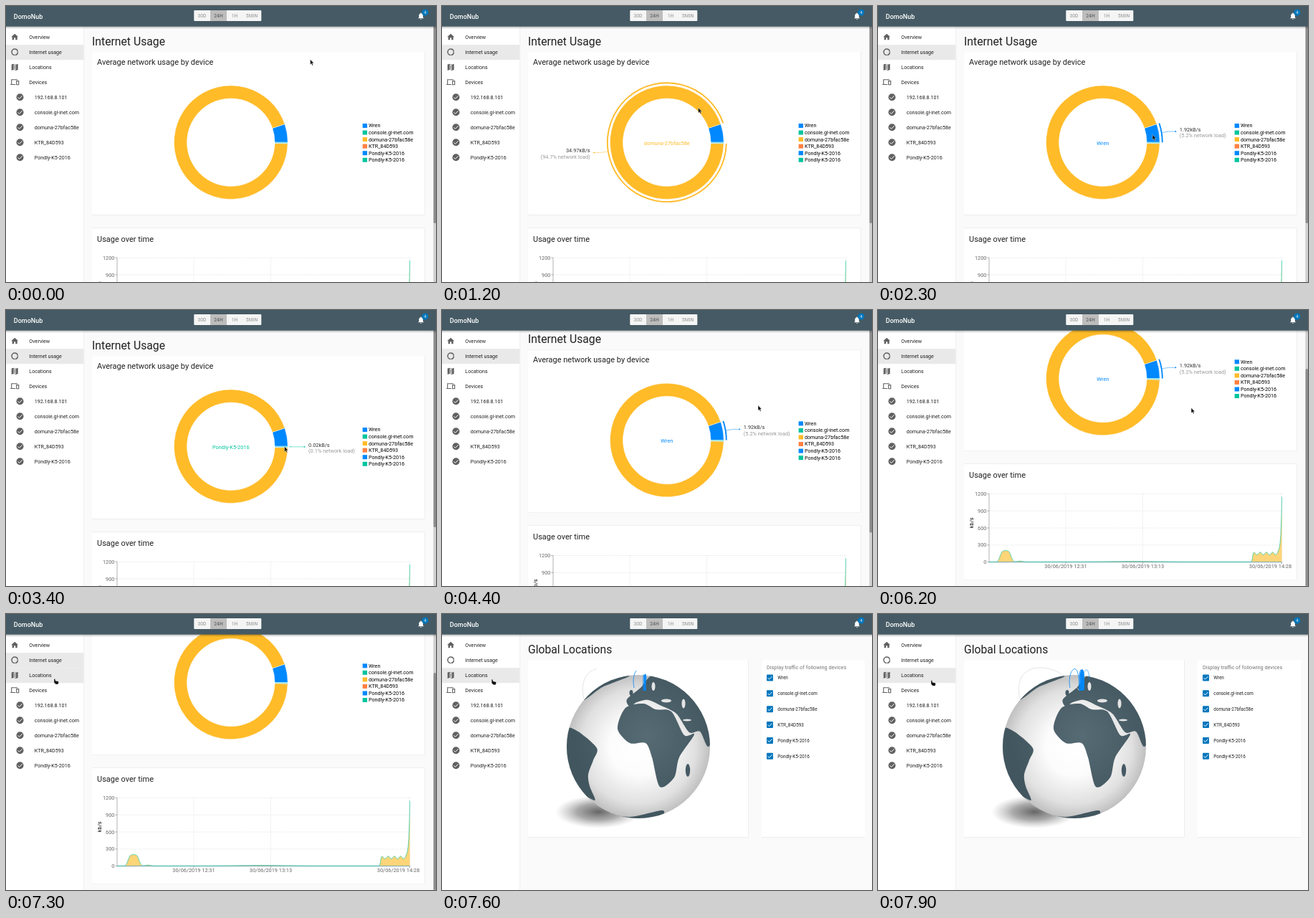
An HTML page that plays this animation: 600x385 px, repeating every 8 s.

```html
<!DOCTYPE html>
<html lang="en">
<head>
<meta charset="utf-8">
<title>Network dashboard</title>
<style>
html, body { margin: 0; width: 100%; height: 100%; overflow: hidden; background: #fafafa; }
svg { display: block; width: 600px; height: 385px; font-family: Roboto, sans-serif; }
.card { fill: #fff; filter: drop-shadow(0 .8px .6px rgba(0,0,0,.26)); }
</style>
</head>
<body>
<svg id="stage" viewBox="0 0 600 385" xmlns="http://www.w3.org/2000/svg"></svg>
<script>
const LOOP = 8000, STEP = 100;
const BLUE = '#0088fe', GREEN = '#00c49f', YELLOW = '#ffbb28', ORANGE = '#ff8042';
const SLATE = '#455a64', ACCENT = '#0277bd', GRAY = '#616161';

const devices = [
  { name: 'Wren', color: BLUE, span: 18.8, rate: '1.92', share: '5.2' },
  { name: 'console.gl-inet.com', color: GREEN, span: 0 },
  { name: 'domuna-27bfac58e', color: YELLOW, span: 340, rate: '34.97', share: '94.7' },
  { name: 'KTR_84D593', color: ORANGE, span: 0 },
  { name: 'Pondly-K5-2016', color: BLUE, span: .4, rate: '0.01', share: '0.0' },
  { name: 'Pondly-K5-2016', color: GREEN, span: .8, rate: '0.02', share: '0.1' }
];
devices.reduce((angle, d) => {
  d.from = angle;
  return d.to = angle + d.span;
}, 0);

const text = (x, y, s, size = 7.15, fill = '#212121', more = '') =>
  `<text x="${x}" y="${y}" font-size="${size}" fill="${fill}" ${more}>${s}</text>`;
const rect = (x, y, w, h, fill, more = '') =>
  `<rect x="${x}" y="${y}" width="${w}" height="${h}" fill="${fill}" ${more}/>`;
const circle = (x, y, r, fill, more = '') => `<circle cx="${x}" cy="${y}" r="${r}" fill="${fill}" ${more}/>`;
const ellipse = (x, y, rx, ry, fill) => `<ellipse cx="${x}" cy="${y}" rx="${rx}" ry="${ry}" fill="${fill}"/>`;
const card = (x, y, w, h) => rect(x, y, w, h, '#fff', 'rx="1" class="card"');
const path = (d, fill, more = '') => `<path d="${d}" fill="${fill}" ${more}/>`;
const line = (d, stroke, w = .5, more = '') => path(d, 'none', `stroke="${stroke}" stroke-width="${w}" ${more}`);
const at = (x, y, s) => `<g transform="translate(${x} ${y})">${s}</g>`;
const MID = 'text-anchor="middle"', END = 'text-anchor="end"';

// Icons, centred on the origin
const tick = line('M-3 .1L-1 2.1L3.1-2', '#fff', 1);
const icons = {
  home: path('M-1 4V1H1V4H3.5V0H5L0-4.5L-5 0H-3.5V4z', GRAY),
  usage: circle(0, 0, 4.2, 'none', `stroke="${GRAY}" stroke-width="1.5" pathLength="100" stroke-dasharray="23 3 71 3"`),
  map: path('M-4.5-3.7L-1.5-4.6L1.5-3.5L4.5-4.6V3.7L1.5 4.6L-1.5 3.5L-4.5 4.6z', GRAY) + line('M-1 -3.5L1-2.8V3.5L-1 2.8z', '#fff', .9),
  devices: line('M4-3.5H-4.5V3M-6 3.2H1M2.5-1.7H5.5V3.5H2.5z', GRAY, 1.1),
  done: circle(0, 0, 5, GRAY) + tick,
  box: rect(-4.5, -4.5, 9, 9, ACCENT, 'rx="1"') + tick,
  bell: path('M-3.8 3V2.6L-2.8 1.6V-1C-2.8-5 2.8-5 2.8-1V1.6L3.8 2.6V3zM-1 3.6H1Q0 5.4-1 3.6z', '#fff') + circle(0, -4, .7, '#fff')
};

// Donut
const CX = 313.8, CY = 190.2, R0 = 61.3, R1 = 79.3, K = .46;
const polar = (r, deg) => {
  const a = deg * Math.PI / 180;
  return [CX + r * Math.cos(a), CY - r * Math.sin(a)];
};
function sector(r0, r1, { from, to, color }, more) {
  const big = to - from > 180 ? 1 : 0;
  return path(`M${polar(r1, from)}A${r1} ${r1} 0 ${big} 0 ${polar(r1, to)}L${polar(r0, to)}` +
    `A${r0} ${r0} 0 ${big} 1 ${polar(r0, from)}z`, color, more);
}
function callout(d) {
  const mid = (d.from + d.to) / 2;
  const [sx, sy] = polar(R1 + 10 * K, mid), [mx, my] = polar(R1 + 30 * K, mid);
  const side = mx > CX ? 1 : -1, ex = mx + side * 21 * K, tx = ex + side * 12 * K;
  const anchor = side > 0 ? '' : END;
  return text(CX, CY + 3.6, d.name, 7.36, d.color, MID) +
    sector(R1 + 6 * K, R1 + 10 * K, d) +
    line(`M${sx} ${sy}L${mx} ${my}H${ex}`, d.color) + circle(ex, my, .95, d.color) +
    text(tx, my, d.rate + 'kB/s', 7.36, '#333', anchor) +
    text(tx, my + 8.3, `(${d.share}% network load)`, 7.36, '#999', anchor);
}

// Usage chart
const X0 = 155, X1 = 563.5, Y0 = 446.4, PX = 95.3 / 1200;
const bump = (x, mid, w, power = 2) => Math.exp(-Math.pow(Math.abs(x - mid) / w, power));
function load(x) {
  const busy = 1 / (1 + Math.exp((522.5 - x) * 2));
  return 4 + 198 * bump(x, 178, 8.5, 4) + 15 * bump(x, 198, 5) + 10 * bump(x, 355, 45) +
    busy * (146 + 24 * Math.cos((x - 542) * .72)) + 1020 * Math.exp((x - X1) / 1.4);
}
function chart() {
  const dash = 'stroke-dasharray="1.4 1.4"', top = Y0 - 1200 * PX;
  let s = '', d = '';
  for (let v = 0; v <= 1200; v += 300) {
    const y = Y0 - v * PX;
    if (v) s += line(`M${X0} ${y}H${X1}`, '#ccc', .5, dash);
    s += line(`M${X0 - 2.8} ${y}H${X0}`, '#666') + text(151.5, y + 2.6, v, 7.36, '#666', END);
  }
  ['12:31', '13:13', '14:28'].forEach((time, i) => {
    const x = Math.min(X1, 262 + i * 107.5 + (i > 1 ? X1 : 0));
    s += line(`M${x} ${top}V${Y0}`, '#ccc', .5, dash) + line(`M${x} ${Y0}v2.8`, '#666') +
      text(Math.min(x, 547.5), 455.2, '30/06/2019 ' + time, 7.36, '#666', MID);
  });
  for (let x = X0; x <= X1; x += .5) d += `${d ? 'L' : 'M'}${x} ${Y0 - load(x) * PX}`;
  return s + line(`M${X0} ${top}V${Y0}H${X1}`, '#666') +
    path(`${d}V${Y0}H${X0}z`, YELLOW, 'fill-opacity=".62"') +
    line(`M${X0} ${Y0 - .2}H${X1}`, BLUE, .4) + line(d, GREEN, .65) +
    text(0, 0, 'kb/s', 7.36, '#000', MID + ' transform="translate(132.5 391.5) rotate(-90)"');
}

function usagePage() {
  const legend = devices.map((d, i) => {
    const y = 167 + i * 9.55;
    return rect(497.6, y - 3, 6.4, 6, d.color) + text(506, y + 2.4, d.name, 7.15, '#000');
  }).join('');
  return text(120, 55, 'Internet Usage', 15.75) + card(120, 64, 464.5, 227.5) +
    text(127, 82, 'Average network usage by device', 11) +
    devices.filter(d => d.span).map(d => sector(R0, R1, d, 'stroke="#fff" stroke-width=".45"')).join('') +
    '<g id="callout"></g>' + legend + card(120, 309.5, 464.5, 162) +
    text(127, 328.5, 'Usage over time', 11) + chart();
}

// Globe: closed smooth outlines through a few coast points
const coasts = {
  africa: '256,131 281,125 298,133 320,136 338,169 352,168 331,200 324,228 304,241 293,200 284,180 262,180 245,160',
  eurasia: '258,119 277,103 300,82 370,80 385,150 372,185 360,164 345,165 327,139 306,128 288,120 272,123 262,129',
  southAmerica: '172,160 190,164 216,187 211,204 204,224 206,240 213,260 185,240 165,195',
  northAmerica: '198,120 214,97 242,82 262,86 236,97 222,103',
  antarctica: '222,277 262,283 308,274 300,288 250,290'
};
function blob(list) {
  const p = list.split(' ').map(s => s.split(',').map(Number)), n = p.length;
  return p.reduce((d, a, i) => {
    const [z, b, c] = [p[(i + n - 1) % n], p[(i + 1) % n], p[(i + 2) % n]];
    const near = j => a[j] + (b[j] - z[j]) / 7, far = j => b[j] - (c[j] - a[j]) / 7;
    return d + `C${near(0)} ${near(1)} ${far(0)} ${far(1)} ${b}`;
  }, 'M' + p[0]) + 'z';
}
let seed = 7;
const random = () => (seed = seed * 16807 % 2147483647) / 2147483647;
const arc = (d, color, w) => line(d, color, w, 'class="arc" pathLength="1" stroke-dasharray="1 1"');

function globePage() {
  const sea = '#e4e4e4';
  let arcs = arc('M198 118C192 92 203 76 224 75S265 86 281 107', '#dcdcdc', .8) +
    arc('M268 103C264 84 274 70 278 80S280 98 282 107', BLUE, .8) +
    arc('M283 107C286 72 294 70 295 92', BLUE, .6);
  for (let i = 0; i < 9; i++) {
    const x = 281 + random() * 3, lean = random() * 4;
    arcs += arc(`M${x} 107C${x - 1} ${65 + random() * 10} ${x + lean + 1} 70 ${x + lean} ${104 + random() * 4}`, BLUE, 1.1);
  }
  return text(120, 55, 'Global Locations', 15.7) + card(120, 64, 307.5, 247.5) + card(446, 64, 144, 247.5) +
    ellipse(218, 276, 60, 23, 'url(#shade)') + circle(274, 185, 100, 'url(#ball)') +
    `<g clip-path="url(#disc)">${path(Object.values(coasts).map(blob).join(''), 'url(#ground)')}` +
    ellipse(313, 121, 7, 2.6, sea) + ellipse(337, 125, 2.5, 6.5, sea) + ellipse(342, 148, 6, 1.5, sea) +
    ellipse(295, 101, 2.5, 6, sea) + ellipse(264, 110, 2.5, 4, SLATE) + ellipse(343, 218, 3.2, 9, SLATE) + '</g>' + arcs +
    text(453, 77.2, 'Display traffic of following devices', 7.33, '#757575') +
    devices.map((d, i) => {
      const y = 89 + i * 21.85;
      return at(457.5, y, icons.box) + text(468.3, y + 2.3, d.name, 6.36);
    }).join('');
}

function sidebar() {
  const rows = [['Overview', 'home'], ['Internet usage', 'usage'], ['Locations', 'map'], ['Devices', 'devices'],
    ['192.168.8.101', 'done'], ...devices.slice(1, 5).map(d => [d.name, 'done'])];
  const mark = (id, y) => rect(0, y, 108.5, 21, '#e8e9e8', `id="${id}"`);
  return rect(0, 28, 108.5, 357, '#fff') + line('M108.7 28V385', '#e0e0e0') +
    mark('rowUsage', 54.2) + mark('rowMap', 75.2) +
    rows.map(([name, icon], i) => {
      const y = 44 + i * 21, nested = icon === 'done';
      return at(nested ? 19.5 : 12.2, y - .7, icons[icon]) + text(nested ? 39.7 : 32.3, y + 2.4, name);
    }).join('');
}

function header() {
  const label = (x, s, fill = '#a5a5a5') => text(x, 16, s, 6.7, fill, MID + ' font-weight="500"');
  return rect(0, 28, 600, 4, 'url(#drop)') + rect(0, 0, 600, 28.6, SLATE) +
    text(10.8, 17.8, 'DomoNub', 9, '#fff', 'font-weight="500"') +
    rect(262.3, 6, 94, 15, '#f5f5f5', 'rx="1"') + rect(285, 6, 23, 15, '#bdbdbd') +
    label(273.5, '30D') + label(296.5, '24H', '#666') + label(319, '1H') + label(343, '5MIN') +
    at(579, 14.3, icons.bell) + circle(584.8, 9, 4.6, ACCENT) + text(584.8, 11, '4', 5.6, '#fff', MID);
}

const stops = list => list.map(([o, c, a = 1]) => `<stop offset="${o}" stop-color="${c}" stop-opacity="${a}"/>`).join('');
const radial = (id, list, more = '') => `<radialGradient id="${id}" ${more}>${stops(list)}</radialGradient>`;
document.getElementById('stage').innerHTML = '<defs>' +
  radial('shade', [[0, '#333', .75], [.5, '#555', .5], [1, '#888', 0]]) +
  radial('ball', [[0, '#fff'], [.4, '#fcfcfc'], [.8, '#e0e0e0'], [1, '#c0c0c0']]) +
  radial('ground', [[0, '#566b74'], [1, '#42565f']], 'gradientUnits="userSpaceOnUse" cx="285" cy="170" r="100"') +
  `<linearGradient id="drop" x2="0" y2="1">${stops([[0, '#000', .32], [1, '#000', 0]])}</linearGradient>` +
  `<clipPath id="disc">${circle(274, 185, 100, '#000')}</clipPath></defs>` +
  rect(0, 0, 600, 385, '#fafafa') +
  `<g id="usage">${usagePage()}</g><g id="globe">${globePage()}</g>` + sidebar() +
  `<g id="bar">${rect(596.3, 0, 3.7, 385, '#d0d0d0')}${rect(596.6, 0, 3.4, 303, '#8c8c8c', 'rx="1.5" id="thumb"')}</g>` + header() +
  '<g id="cursor" stroke="#fff" stroke-width=".35">' +
  path('M0 0V7.3L1.7 5.8L2.9 8.4L4.1 7.9L2.9 5.3H5.1z', '#111', 'id="arrow"') +
  path('M0 .5Q1-.5 1.6.8L2.2 2.9L5.4 3.5Q6.8 4 6.4 5.2L5.8 7.8H2.4L0 5.2z', '#111', 'id="hand"') + '</g>';

// Pointer trips: start, steps, where to, optional bend
const HOME = [424.5, 74.5];
const trips = [
  { start: 100, steps: 7, to: [357, 141] },
  { start: 1200, steps: 7, to: [383, 179.3] },
  { start: 2300, steps: 9, to: [388, 191.1] },
  { start: 3400, steps: 9, to: [441, 133] },
  { start: 6200, steps: 9, to: [82, 98], bend: [270, 285] },
  { start: 7100, steps: 1, to: [67, 90.3] },
  { start: 7500, steps: 5, to: [74, 92.5] }
];
const stepOf = (t, start, n) => Math.max(0, Math.min(n, Math.floor((t - start) / STEP) + 1));
const ease = q => q * q * q * (10 + q * (6 * q - 15));
const scrollAt = t => t < 4300 ? 0 : 94.9 / (1 + Math.exp(2.13 * (3.081 - stepOf(t, 4300, 6))));

function pointer(t) {
  return trips.reduce((a, { start, steps, to, bend }) => {
    const p = ease(stepOf(t, start, steps) / steps);
    return a.map((v, i) => {
      const c = bend ? bend[i] : (v + to[i]) / 2;
      return (1 - p) * (1 - p) * v + 2 * p * (1 - p) * c + p * p * to[i];
    });
  }, HOME);
}

// The last sector touched stays active until the pointer leaves the chart
function hoverAt(t) {
  let hit;
  for (let u = 0; u <= t; u += STEP) {
    const [px, py] = pointer(u), x = px - CX, y = py + scrollAt(u) - CY, r = Math.hypot(x, y);
    const angle = (Math.atan2(-y, x) * 180 / Math.PI + 360) % 360;
    if (r > R0 && r < R1) hit = devices.find(d => angle >= d.from && angle < d.to);
    else if (y > 98) hit = undefined;
  }
  return hit;
}

const $ = id => document.getElementById(id);
const show = (id, on) => { $(id).style.display = on ? '' : 'none'; };

let shown;
function draw(now) {
  const t = Math.floor((now % LOOP) / STEP) * STEP;
  if (t !== shown) {
    shown = t;
    const onGlobe = t >= 7500, scroll = scrollAt(t), hover = hoverAt(t);
    $('callout').innerHTML = hover ? callout(hover) : '';
    show('usage', !onGlobe);
    show('globe', onGlobe);
    show('bar', !onGlobe);
    show('rowUsage', !onGlobe);
    show('rowMap', t >= 7100);
    show('arrow', t < 7300);
    show('hand', t >= 7300);
    $('usage').setAttribute('transform', `translate(0 ${-scroll})`);
    $('thumb').setAttribute('y', scroll * .866);
    $('cursor').setAttribute('transform', `translate(${pointer(t)})`);
    const grown = stepOf(t, 7500, 5) / 5;
    document.querySelectorAll('.arc').forEach(a => a.setAttribute('stroke-dashoffset', 1 - grown));
  }
  requestAnimationFrame(() => draw(performance.now() - begin));
}
const begin = performance.now();
draw(0);
</script>
</body>
</html>
```
